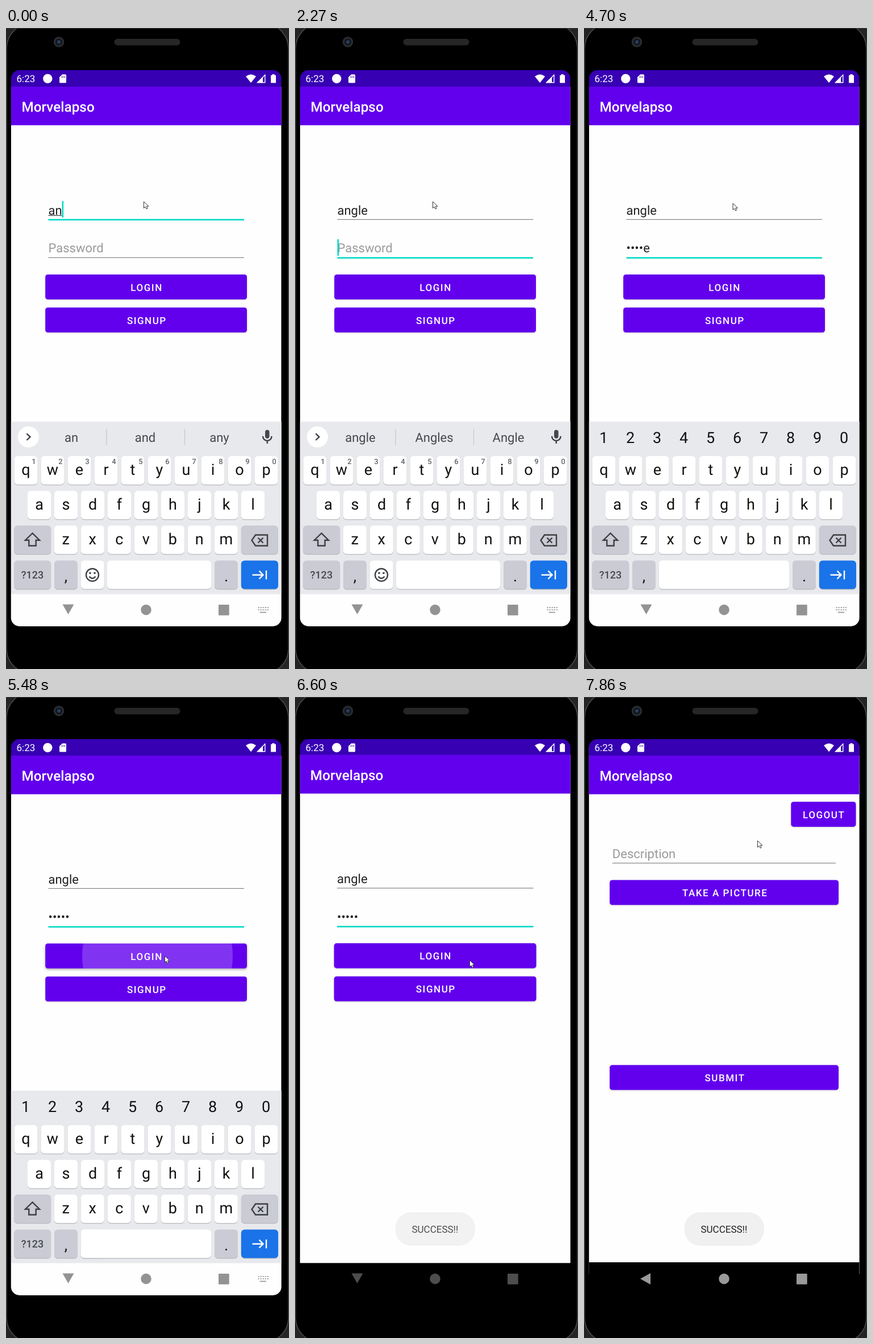
Recreate the animation shown at these times as an HTML page. Size 498 by 1126 pixels, loop 8 s.

```html
<!DOCTYPE html>
<html lang="en">
<head>
<meta charset="utf-8">
<title>Login demo</title>
<style>
  html, body { margin: 0; width: 100%; height: 100%; overflow: hidden; background: #000; }
  svg { display: block; width: 498px; height: 1126px; }
  text { font-family: Roboto, sans-serif; font-size: 22px; fill: #222; white-space: pre; text-rendering: geometricPrecision; }
  .mid { text-anchor: middle; }
  .title { font-size: 24.3px; font-weight: 500; fill: #fff; }
  .label { font-size: 17px; font-weight: 500; letter-spacing: 1.52px; fill: #fff; text-anchor: middle; }
  .hint { fill: #9a9a9a; }
  .key { font-size: 27px; fill: #111; text-anchor: middle; }
  .sup { font-size: 13px; font-weight: 500; fill: #5f6368; text-anchor: middle; }
  .sug { fill: #44474c; text-anchor: middle; }
  .btn { fill: #6200ee; filter: drop-shadow(0 1px .8px #0003); }
  .btn.down { filter: drop-shadow(0 2px 2px #0005); }
  .line { fill: #858585; }
  .teal { fill: #03dac5; }
  .icon { fill: none; stroke: #3c3f43; stroke-width: 2.4; }
  .window { transform-origin: 246.5px 562.5px; }
</style>
</head>
<body>
<svg viewBox="0 0 498 1126">
  <defs>
    <clipPath id="glass"><rect x="8.8" y="74" width="475.8" height="977" rx="15"/></clipPath>
    <clipPath id="loginShape"><rect x="69.2" y="433" width="354.8" height="43.7" rx="4.5"/></clipPath>
    <g id="bars">
      <rect x="8.8" y="74" width="475.8" height="977"/>
      <rect x="8.8" y="103" width="475.8" height="890" fill="#fefefe"/>
      <rect x="8.8" y="74" width="475.8" height="29.3" fill="#3700b3"/>
      <rect x="8.8" y="103" width="475.8" height="67.8" fill="#6200ee"/>
      <text class="title" x="27.5" y="147">Morvelapso</text>
    </g>
  </defs>

  <!-- phone body -->
  <rect width="498" height="1126" fill="#242424"/>
  <rect x="1" y="-8" width="496" height="1142" rx="44" stroke="#4c4c4c" stroke-width="1.4"/>
  <path d="M0 .5H498" stroke="#3a3a3a"/>
  <rect x="190.5" y="19" width="116" height="11.5" rx="5.7" fill="#262626"/>
  <circle cx="93" cy="24.5" r="9.3" fill="#2b2c2f"/>
  <circle cx="93" cy="24.5" r="6" fill="#10151f"/>
  <circle cx="93" cy="24.5" r="3" fill="#28405f"/>

  <g clip-path="url(#glass)">
    <g id="login" class="window">
      <use href="#bars"/>
      <text id="user" x="74.5" y="327.7"></text>
      <rect id="compose" x="74.5" y="328.8" height="1.2" fill="#333"/>
      <rect id="line0" x="74.5" width="344.5"/>
      <text id="hint" class="hint" x="74.5" y="394.3">Password</text>
      <text id="pass" x="74.5" y="394.3"></text>
      <rect id="line1" x="74.5" width="344.5"/>
      <rect id="caret" class="teal" width="2.5" height="29"/>
      <rect id="loginBtn" class="btn" x="69.2" y="433" width="354.8" height="43.7" rx="4.5"/>
      <g clip-path="url(#loginShape)"><circle id="ripple" cy="455" fill="#fff"/></g>
      <text class="label" x="247.5" y="461.5">LOGIN</text>
      <rect class="btn" x="69.2" y="491" width="354.8" height="43.7" rx="4.5"/>
      <text class="label" x="247.8" y="519.5">SIGNUP</text>
    </g>

    <g id="post" class="window">
      <use href="#bars"/>
      <rect class="btn" x="364.3" y="184" width="114.2" height="43.9" rx="4.5"/>
      <text class="label" x="422.2" y="212.8">LOGOUT</text>
      <text class="hint" x="49.8" y="283">Description</text>
      <rect class="line" x="50" y="291.2" width="393" height="1.2"/>
      <rect class="btn" x="45.2" y="321.4" width="402.8" height="43.8" rx="4.5"/>
      <text class="label" x="248.2" y="350">TAKE A PICTURE</text>
      <rect class="btn" x="45.2" y="646.4" width="402.8" height="43.8" rx="4.5"/>
      <text class="label" x="248" y="675">SUBMIT</text>
    </g>

    <g id="board">
      <rect x="8" y="691.5" width="478" height="304" fill="#e8e9ed"/>
      <rect x="8" y="994.5" width="478" height="57" fill="#fefefe"/>
      <g id="keys"></g>
      <g id="words">
        <circle cx="39.5" cy="718.3" r="18.5" fill="#fff"/>
        <path class="icon" d="M36.500 712.500L42.500 718.300L36.500 724"/>
        <path d="M177 704V733M314.500 704V733" stroke="#c3c5c9" stroke-width="1.2"/>
        <text class="sug" x="115" y="727"></text>
        <text class="sug" x="245" y="727"></text>
        <text class="sug" x="375.5" y="727"></text>
        <rect x="456" y="706" width="7.5" height="15" rx="3.7" fill="#44474c"/>
        <path class="icon" d="M452 717C452 727.500 467.500 727.500 467.500 717M459.700 725V730"/>
        <g id="sups"></g>
      </g>
      <g id="digits"></g>
      <g id="emoji">
        <circle class="icon" cx="152" cy="960.7" r="11"/>
        <circle cx="148" cy="957.5" r="1.8" fill="#3c3f43"/>
        <circle cx="156" cy="957.5" r="1.8" fill="#3c3f43"/>
        <path class="icon" d="M146.500 963.500Q152 970 157.500 963.500"/>
      </g>
      <path class="icon" d="M46.500 887.500L34 899.700H40.300V909.500H52.700V899.700H59Z"/>
      <path class="icon" d="M439 890.500H460V909.500H439L432.500 900ZM443.500 895.500L452.500 904.500M452.500 895.500L443.500 904.500"/>
      <path class="icon" style="stroke:#fff" d="M433.500 960.700H452M445.500 953.700L452.500 960.700L445.500 967.700M458 953V968.500"/>
      <text class="mid" x="46.5" y="967" style="font-size:18px;font-weight:500;fill:#44474c">?123</text>
      <text class="key" x="105.5" y="972">,</text>
      <text class="key" x="387.5" y="972">.</text>
      <path d="M443.500 1018H462M443.500 1022H462" stroke="#a3a3a3" stroke-width="2.2" stroke-dasharray="2.2 1.85"/>
      <path d="M446.500 1026.500H458" stroke="#a3a3a3" stroke-width="2"/>
    </g>

    <g id="nav">
      <path id="back"/>
      <circle cx="246.5" cy="1022" r="9.2"/>
      <rect x="374" y="1013" width="18.7" height="18.7" rx="1"/>
    </g>

    <g id="toast">
      <rect x="176.5" y="905" width="140.5" height="59" rx="28" fill="#f0f0f0"/>
      <text x="205.5" y="941" style="font-size:17px">SUCCESS!!</text>
    </g>

    <g fill="#fff">
      <text x="18.5" y="95.3" style="font-size:17px;fill:#fff">6:23</text>
      <circle cx="73.3" cy="89" r="8.2"/>
      <path d="M99 81.500H104.500Q106 81.500 106 83V95Q106 96.500 104.500 96.500H95.500Q94 96.500 94 95V86.500Z"/>
      <path d="M98.500 84.500V87.500M101 84.500V87.500M103.500 84.500V87.500" stroke="#3700b3"/>
      <path d="M431 96.300L422 85Q431 78 440 85Z"/>
      <path d="M442.500 95.700L455.800 82.500V95.700Z" fill="none" stroke="#fff" stroke-width="1.4"/>
      <path d="M442 96.300L452 86V96.300Z"/>
      <path d="M466 83H468.300V81.300H472.700V83H475V96.500H466Z"/>
    </g>
  </g>
  <path id="mouse" d="M0 0V11.500L2.700 9L4.600 13L6.600 12L4.800 8.200H8.500Z" fill="#fff" stroke="#333"/>
</svg>

<script>
const $ = id => document.getElementById(id);
const set = (el, attrs) => { for (const k in attrs) el.setAttribute(k, attrs[k]); };
const add = (parent, tag, attrs, text = '') => {
  const el = document.createElementNS('http://www.w3.org/2000/svg', tag);
  set(el, attrs);
  el.textContent = text;
  return parent.appendChild(el);
};

// keyboard
function key(x, y, width, fill = '#fff') {
  const box = { x, width, height: 50, rx: 6 };
  const shade = add($('keys'), 'rect', { ...box, y: y + 1.2, fill: '#b7b9be' });
  return [shade, add($('keys'), 'rect', { ...box, y, fill })];
}
const GREY = '#cacbd4', PITCH = 47, LAST_ROW = 935.5;
[['qwertyuiop', 35, 752], ['asdfghjkl', 58.5, 813], ['zxcvbnm', 105.3, 874]].forEach(([row, x0, y]) =>
  [...row].forEach((ch, i) => {
    const x = x0 + i * PITCH;
    key(x - 20.5, y, 41);
    add($('keys'), 'text', { class: 'key', x, y: y + 32.5 }, ch);
  }));
for (let i = 0; i < 10; i++) {
  const x = 35 + i * PITCH, digit = (i + 1) % 10;
  add($('sups'), 'text', { class: 'sup', x: x + 14, y: 766 }, digit);
  add($('digits'), 'text', { class: 'key', x: x - .5, y: 728.5 }, digit);
}
key(14.2, 874, 65, GREY);
key(413.8, 874, 65, GREY);
key(14.2, LAST_ROW, 65, GREY);
key(85, LAST_ROW, 41, GREY);
key(131.7, LAST_ROW, 41);
const space = key(178, LAST_ROW, 183);
key(367, LAST_ROW, 41, GREY);
key(413.8, LAST_ROW, 65.2, '#1a73e8');

// each step changes part of the state
const start = {
  user: 'an', pass: '', focus: 0, caret: 1, words: 'an and any', digits: 0, mouse: [242.5, 305],
  ripple: [0, 0, 0], board: [0, 1], old: 1, fresh: 0, toast: 0, nav: '#939393'
};
const steps = [
  [120, { user: 'ang' }],
  [260, { words: 'ang angry angel' }],
  [830, { user: 'angl' }],
  [1080, { words: 'angl angle anglers' }],
  [1480, { user: 'angle' }],
  [1620, { words: 'angle Angles anglers' }],
  [1760, { words: 'angle Angles Angle' }],
  [1900, { caret: 0 }],
  [2270, { focus: 1, caret: 1 }],
  [2420, { digits: 1 }],
  [2820, { caret: 0 }],
  [3220, { pass: 'a', caret: 1 }],
  [3370, { pass: '•n' }],
  [3520, { pass: '••g' }],
  [3800, { pass: '•••l' }],
  [3950, { pass: '••••e' }],
  [4450, { caret: 0 }],
  [4700, { mouse: [262, 308] }],
  [4830, { mouse: [286, 318] }],
  [4950, { mouse: [293, 345], caret: 1 }],
  [5080, { mouse: [285, 420] }],
  [5200, { mouse: [279.5, 455] }],
  [5340, { ripple: [274, 62, .2] }],
  [5480, { ripple: [266.5, 132.5, .2], pass: '•••••', caret: 0 }],
  [5630, { ripple: [250, 190, .2] }],
  [5780, { ripple: [246.5, 200, .1] }],
  [5920, { ripple: [0, 0, 0], caret: 1 }],
  [6050, { mouse: [295, 460] }],
  [6180, { mouse: [307.5, 462.5] }],
  [6450, { caret: 0, board: [130, .6] }],
  [6600, { board: [0, 0], old: 1.003, toast: .8, nav: '#4d4d4d' }],
  [6720, { old: 1.035, fresh: .97, toast: 1, nav: '#777' }],
  [6870, { old: 1.0485, fresh: .998, nav: '#999' }],
  [7020, { fresh: 1 }],
  [7410, { mouse: [340, 600] }],
  [7560, { mouse: [389, 757] }],
  [7710, { mouse: [350, 540] }],
  [7860, { mouse: [305.5, 252.5] }]
];
const LOOP = 8000;
const show = (id, opacity) => set($(id), { opacity });
const zoom = (id, s) => { $(id).style.transform = `scale(${s})`; };

function draw(s) {
  $('user').textContent = s.user;
  $('pass').textContent = s.pass;
  const widths = [$('user'), $('pass')].map(el => el.textContent ? el.getComputedTextLength() : 0);
  show('hint', s.pass ? 0 : 1);
  set($('compose'), { width: widths[0], opacity: s.focus ? 0 : 1 });
  [336, 403].forEach((y, i) => {
    const on = s.focus === i;
    set($('line' + i), { y: on ? y - .5 : y - .2, height: on ? 2.6 : 1.2, class: on ? 'teal' : 'line' });
  });
  set($('caret'), { x: 74.5 + widths[s.focus], y: s.focus ? 371 : 304, opacity: s.caret });

  const words = s.words.split(' ');
  document.querySelectorAll('.sug').forEach((el, i) => { el.textContent = words[i]; });
  show('words', 1 - s.digits);
  show('emoji', 1 - s.digits);
  show('digits', s.digits);
  space.forEach(el => set(el, s.digits ? { x: 131.7, width: 229.3 } : { x: 178, width: 183 }));
  set($('board'), { transform: `translate(0 ${s.board[0]})`, opacity: s.board[1] });

  const [cx, r, alpha] = s.ripple;
  set($('ripple'), { cx, r, opacity: alpha });
  set($('loginBtn'), { class: alpha ? 'btn down' : 'btn' });
  zoom('login', s.old);
  zoom('post', s.fresh || 1);
  show('post', s.fresh ? 1 : 0);
  show('toast', s.toast);
  set($('nav'), { fill: s.nav });
  set($('back'), { d: s.fresh ? 'M99 1022L117 1012V1032Z' : 'M99.5 1012.5H119.5L109.5 1030Z' });
  set($('mouse'), { transform: `translate(${s.mouse})` });
}

let last = -1;
function tick() {
  const t = performance.now() % LOOP;
  const past = steps.filter(([at]) => at <= t);
  if (past.length !== last) {
    last = past.length;
    draw(Object.assign({}, start, ...past.map(([, change]) => change)));
  }
  requestAnimationFrame(tick);
}
tick();
</script>
</body>
</html>
```
